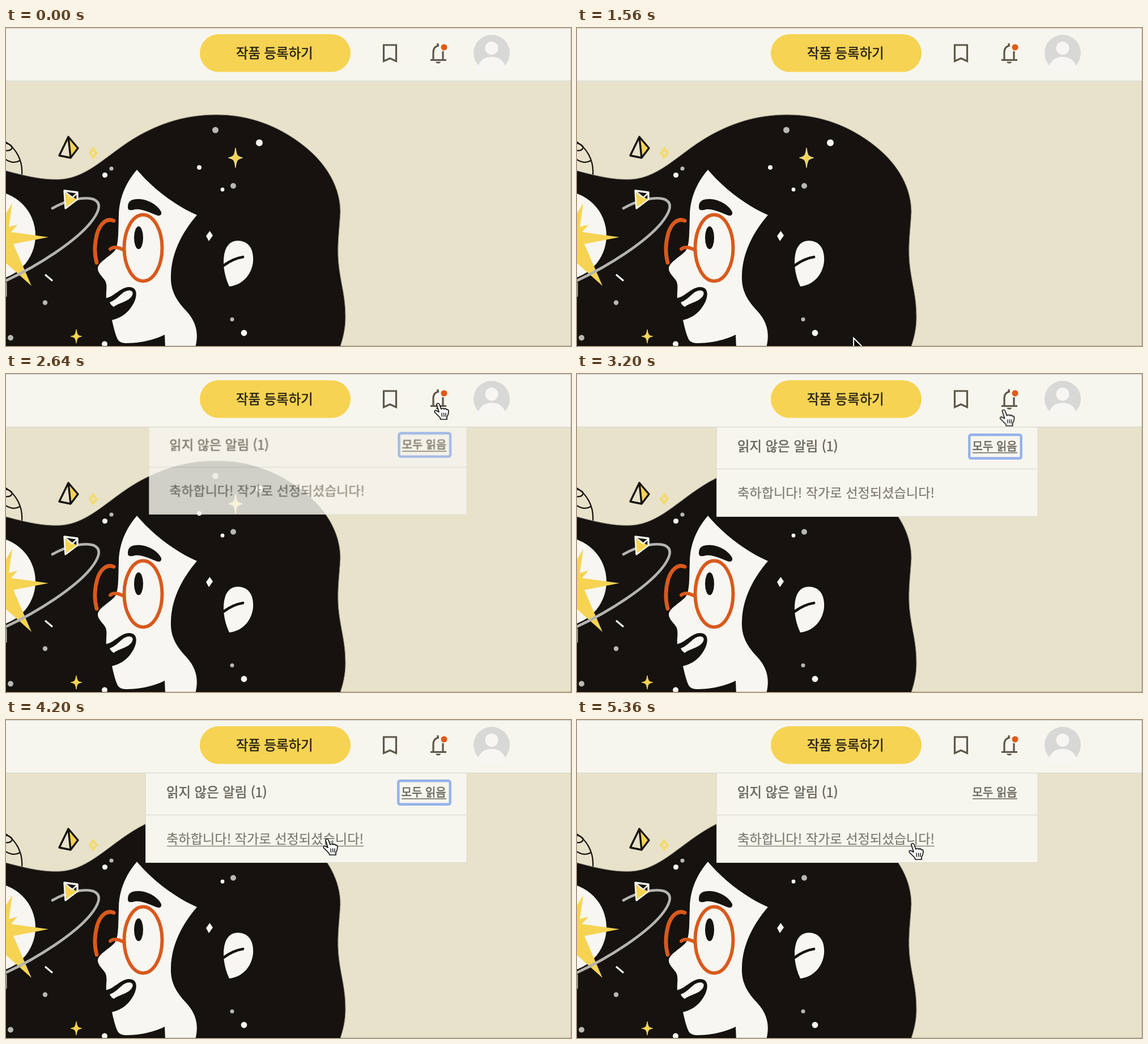
Animation, 997 px wide and 561 px high, one loop 5.4 s. Source, as an HTML page:

```html
<!DOCTYPE html>
<html lang="ko">
<head>
<meta charset="utf-8">
<title>알림</title>
<style>
  html, body { margin: 0; width: 100%; height: 100%; overflow: hidden; background: #e8e2ca; }
  svg { display: block; width: 100vw; height: 100vh; }
  text { font: 400 23.4px "Noto Sans CJK KR", "Noto Sans CJK", "Noto Sans", sans-serif; stroke-width: .2; }
  .mid { font-weight: 500; stroke-width: .55; }
  .ink { fill: #15120f; }
  .pale { fill: #f7f6f0; }
  .gray { fill: #b9b8b4; }
  .sun { fill: #f6d353; }
  .dim { fill: #67635b; stroke: #67635b; }
  .soft { fill: #7b776f; stroke: #7b776f; }
  .dark { fill: #262013; stroke: #262013; }
  .line { fill: none; stroke: #15120f; stroke-linecap: round; stroke-linejoin: round; }
  .frame { fill: none; stroke: #d9591c; stroke-width: 6; stroke-linecap: round; }
  .icon { fill: none; stroke: #5d5749; stroke-width: 3.2; }

  #panel, #cursor, #arrow, #hand, #ring, #under {
    animation-duration: 5400ms;
    animation-iteration-count: infinite;
    animation-timing-function: linear;
  }
  #arrow, #hand, #ring, #under { animation-timing-function: step-end; }

  #panel { transform-origin: 812px 94px; animation-name: open; }
  @keyframes open {
    0%, 46.2% {
      opacity: 0; transform: translateY(-16px) scale(.94, .96);
      animation-timing-function: cubic-bezier(.4, 0, .2, 1);
    }
    51.11%, 100% { opacity: 1; transform: none; }
  }

  #cursor { animation-name: move; }
  @keyframes move {
    0%, 28.15% { transform: translate(472px, 580px); }
    28.89% { transform: translate(486px, 548px); }
    29.63% { transform: translate(575px, 503px); }
    30.37% { transform: translate(698px, 447px); }
    31.11% { transform: translate(808px, 392px); }
    31.85% { transform: translate(887px, 325px); }
    32.59% { transform: translate(934px, 250px); }
    33.33% { transform: translate(946px, 180px); }
    34.81% { transform: translate(890px, 98px); }
    36.3%  { transform: translate(802px, 64px); }
    37.04% { transform: translate(782px, 60px); }
    39.26% { transform: translate(766px, 53px); }
    41.48%, 57.78% { transform: translate(761px, 52px); }
    62.22% { transform: translate(733px, 86px); }
    64.44% { transform: translate(700px, 120px); }
    68.89% { transform: translate(642px, 178px); }
    73.33% { transform: translate(582px, 207px); }
    77.78%, 87.41% { transform: translate(565px, 210px); }
    94.81%, 100% { transform: translate(591px, 218px); }
  }

  #arrow { animation-name: arrow; }
  @keyframes arrow {
    0% { opacity: 1; }
    36.6% { opacity: 0; }
    62.9% { opacity: 1; }
    67.7%, 100% { opacity: 0; }
  }
  #hand { animation-name: hand; }
  @keyframes hand {
    0% { opacity: 0; }
    36.6% { opacity: 1; }
    62.9% { opacity: 0; }
    67.7%, 100% { opacity: 1; }
  }
  #ring { animation-name: blur; }
  @keyframes blur {
    0% { opacity: 1; }
    90.7%, 100% { opacity: 0; }
  }
  #under { animation-name: hover; }
  @keyframes hover {
    0% { opacity: 0; }
    71.1%, 100% { opacity: 1; }
  }
</style>
</head>
<body>
<svg viewBox="0 0 997 561" preserveAspectRatio="none">
  <defs>
    <clipPath id="below"><rect y="94" width="997" height="467"/></clipPath>
    <path id="spark" d="M0 -17C1.5 -4 3 -2 12 0C3 2 1.5 4 0 17C-1.5 4 -3 2 -12 0C-3 -2 -1.5 -4 0 -17Z"
      stroke-width="1.4" stroke-linejoin="round"/>
  </defs>

  <rect width="997" height="561" fill="#e8e2ca"/>

  <!-- planet and pyramid behind the hair -->
  <g class="line" stroke-width="2.2">
    <path d="M-2 200C17 211 30 233 28 259"/>
    <path d="M-2 203C4 204 9 206 11 210C10 216 4 217 -2 216"/>
    <path d="M-2 231C8 238 16 239 24 234"/>
  </g>
  <path class="sun" d="M111 194L126 212L114 228Z"/>
  <path class="line" stroke-width="3.4" d="M110 192L94 225L114 229L127 212ZL114 229"/>
  <path d="M154 213L159.5 220.5L154 228L148.5 220.5Z" fill="none" stroke="#f3db70" stroke-width="4.5"/>

  <!-- hair -->
  <path class="ink" stroke="#8f8b7f" stroke-width="1" d="M-3 251C38 262 65 268 95 267C150 264 185 214 245 184
    C290 161 330 153 372 153C430 153 482 173 526 208C570 243 590 285 590 325
    C588 360 583 390 588 425C592 455 599 475 599 510C599 530 595 547 589 564H-3Z"/>

  <!-- sun and orbit -->
  <circle class="pale" cx="-26.6" cy="366" r="78.6"/>
  <path class="sun" d="M-3 332L11 309L5 351L20 347L9 360L75 369L13 381L45 455L-3 412Z"/>
  <path d="M82 318C108 303 140 297 154 302C172 309 162 328 148 345C122 376 60 418 -3 447"
    fill="none" stroke="#b5b4b0" stroke-width="4.6" stroke-linecap="round"/>
  <path d="M0 449V474" stroke="#b5b4b0" stroke-width="3"/>
  <path class="ink" d="M103 287L126 290L126 302L105 318Z" stroke="#f7f6f0" stroke-width="3.4" stroke-linejoin="round"/>
  <path class="sun" d="M104 291L125 302L106 316Z"/>
  <path d="M103 288L117 299L126 291" fill="none" stroke="#f7f6f0" stroke-width="2.5"/>

  <!-- stars -->
  <g class="pale">
    <circle cx="447" cy="202.5" r="6"/>
    <circle cx="341" cy="246" r="4"/>
    <circle cx="382" cy="285" r="3.4"/>
    <circle cx="174.5" cy="259.5" r="4.6"/>
    <circle cx="174" cy="557.5" r="5"/>
    <circle cx="420" cy="538" r="5.4"/>
    <path d="M359.5 358L365 366L358 376L353 367Z"/>
  </g>
  <g class="gray">
    <circle cx="369.5" cy="180" r="5.5"/>
    <circle cx="401" cy="278.5" r="5"/>
    <circle cx="186" cy="248" r="3.6"/>
    <circle cx="69" cy="484.5" r="4.2"/>
    <circle cx="8" cy="546.5" r="5"/>
    <circle cx="399" cy="514" r="3.5"/>
  </g>
  <path d="M69 435L82 446" stroke="#f7f6f0" stroke-width="3.2"/>
  <g class="sun">
    <use href="#spark" x="405" y="229" stroke="#f0dc93"/>
    <use href="#spark" transform="translate(124 544) scale(.8 .7)" stroke="#f6d353"/>
  </g>

  <!-- face -->
  <path class="pale" d="M231 250C214 270 200 296 199 330C198 362 199 385 191 394C180 405 164 413 162 423
    C161 433 173 440 176 448C179 457 176 465 177 478L187 515C190 530 193 540 196 547C199 555 206 556 214 556
    C240 556 264 549 280 541L281 564H334C340 540 337 520 318 499C298 478 290 460 291 437
    C292 394 313 358 337 330C305 316 264 289 231 250Z"/>
  <path class="ink" d="M174 477C191 475 200 458 217 457C232 457 232 471 226 484C218 500 205 512 184 516Z"/>
  <path class="pale" d="M183 484C199 478 204 464 217 463C227 463 225 473 216 479C208 484 196 487 190 492C187 490 184 487 183 484Z"/>
  <path class="ink" d="M215 316C215 303 225 301 238 302C255 304 270 315 274 325C275 331 270 332 265 330
    C250 324 235 317 224 321C218 322 215 321 215 316Z"/>
  <ellipse class="ink" cx="234" cy="370" rx="8" ry="20"/>
  <g class="frame">
    <ellipse cx="242" cy="388" rx="33.5" ry="58.5"/>
    <path d="M190 340C179 335 167 343 161 362C156 380 156 399 160 414" stroke-width="6.8"/>
    <path d="M184 390C190 385 199 387 208 392"/>
  </g>
  <path class="pale" d="M394 456C384 435 381 410 387 392C393 376 405 374 416 376C432 380 437 395 436 412C434 432 420 453 394 456Z"/>
  <path class="line" stroke-width="4.8" d="M384 419C395 411 405 406 418 404"/>

  <!-- notification panel -->
  <g clip-path="url(#below)">
    <g id="panel">
      <rect x="246.5" y="90" width="566.5" height="161.5" fill="#f7f6ee" stroke="#dcdad2"/>
      <path d="M247 167.5H812" stroke="#dcdcdb" stroke-width="1.3"/>
      <text class="mid dim" x="283" y="136">읽지 않은 알림 (1)</text>
      <text class="mid dim" x="697.5" y="134.5" style="font-size:20px">모두 읽음</text>
      <path d="M698 139H777" stroke="#67635b" stroke-width="1.5"/>
      <rect id="ring" x="692.3" y="107.3" width="91.4" height="41.4" rx="3" fill="none" stroke="#94b1ec" stroke-width="4.4"/>
      <text class="soft" x="283" y="217.5" style="font-size:23.2px">축하합니다! 작가로 선정되셨습니다!</text>
      <path id="under" d="M284 222.5H631" stroke="#8a867e" stroke-width="1.5"/>
    </g>
  </g>

  <!-- header -->
  <rect width="997" height="93" fill="#f7f6ee"/>
  <path d="M0 93.5H997" stroke="#dcdbd7" stroke-width="1.5"/>
  <rect x="342" y="11" width="266" height="66.5" rx="33.25" fill="#f6d353"/>
  <text class="mid dark" x="406" y="52.5">작품 등록하기</text>
  <path class="icon" d="M666.5 30H688.5V58.5L677.5 53.5L666.5 58.5Z"/>
  <path class="icon" d="M754 56V43C754 36 758 32 764 31M762 32V27M771 41V56M749 56.5H777"/>
  <path d="M758.5 59.5H767A4.2 3 0 0 1 758.5 59.5Z" fill="#5d5749"/>
  <circle cx="773" cy="34" r="5.5" fill="#e15a17"/>
  <circle cx="857" cy="44" r="32" fill="#d8d8d7"/>
  <g fill="#f7f6f2">
    <circle cx="857" cy="35.5" r="11.5"/>
    <path d="M832 77C832 60 842 51 857 51C872 51 882 60 882 77Z"/>
  </g>

  <path d="M0 .5H997M996.5 0V561M0 560.5H997" fill="none" stroke="#000" stroke-opacity=".18"/>

  <g id="cursor">
    <path id="arrow" d="M0 0V25L5.5 19.5L9.5 28.5L13.5 27L9.7 18H18Z" fill="#000" stroke="#fff" stroke-width="2"/>
    <g id="hand">
      <g transform="translate(-6 -2)" stroke="#111" stroke-linejoin="round" stroke-linecap="round">
        <path d="M5 4C5 1 9 1 10 4L13 12C14 10 17 10 18 12C19 10.5 22 11 22.5 13C24 12 26 13 26 16
          C26 21 25 23 23 26V30H12L11 27C8 24 5 21 2 18C0 15 3 13 5 15L9 17Z" fill="#fff" stroke-width="1.7"/>
        <path d="M14 19L14.5 25M17.5 19L18 25M21 19V25" fill="none" stroke-width="1.4"/>
      </g>
    </g>
  </g>
</svg>
</body>
</html>
```
